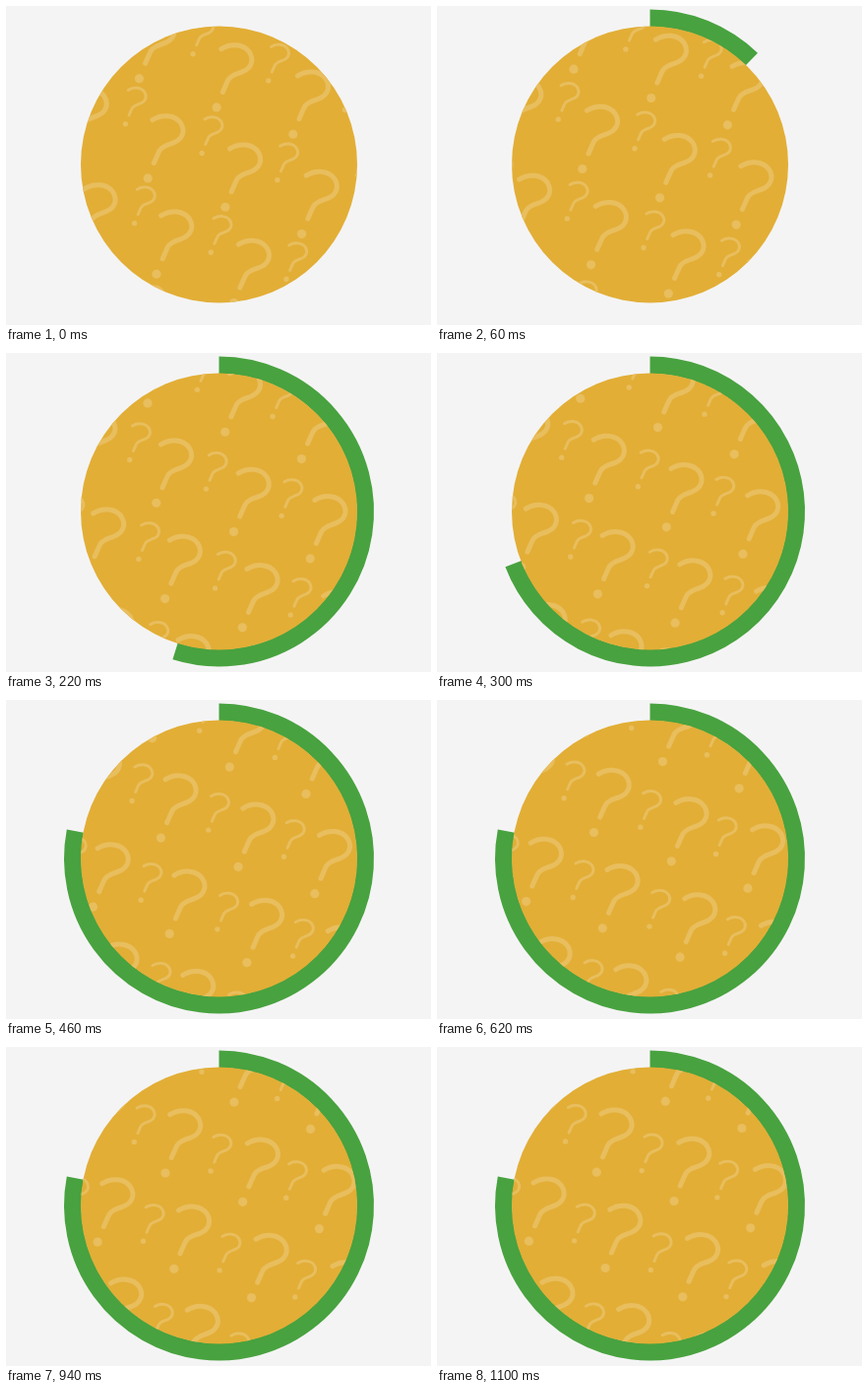
Recreate the animation shown at these times as an HTML page. Size 432 by 324 pixels, loop 1240 ms.

```html
<!DOCTYPE html>
<html lang="en">
<head>
<meta charset="utf-8">
<title>Question dial</title>
<style>
  html, body { margin: 0; width: 100%; height: 100%; overflow: hidden; background: #f4f4f4; }
  svg { display: block; width: 100vw; height: 100vh; }
</style>
</head>
<body>
<svg viewBox="0 0 432 324">
  <defs>
    <clipPath id="disc"><circle cx="216.5" cy="161" r="140.5"/></clipPath>
    <g id="mark">
      <path d="M4.7-59.4C14-65.3 27.5-64.7 33.4-56C38.4-47.8 35.3-39.6 26-36C20-33.6 15-33 11.8-28C9.8-24 8-19.5 6.2-15.5"
        fill="none" stroke="#e8be5e" stroke-width="5" stroke-linecap="round" stroke-linejoin="round"/>
      <circle r="4.6" fill="#e8be5e"/>
    </g>
  </defs>
  <path id="ring" fill="none" stroke="#48a23f" stroke-width="17.5"/>
  <circle cx="216.5" cy="161" r="140.5" fill="#e2ae36"/>
  <g clip-path="url(#disc)">
    <g id="big"></g>
    <g id="small"></g>
  </g>
</svg>
<script>
const LOOP = 1240;
const CX = 216.5, CY = 161, RING_R = 148.75;
const SWEEP = 0.78 * 2 * Math.PI;
const DRIFT = { x: 18.2, y: -48 };
const $ = id => document.getElementById(id);
const clamp = v => Math.min(1, Math.max(0, v));

// Slanted grid of marks; odd columns and rows sit slightly off the even ones.
function addMarks(layer, { x, y, scale, col, row, oddCol, oddRow }) {
  let marks = "";
  for (let r = 0; r < 4; r++) {
    for (let c = 0; c < 5; c++) {
      const px = x + c * col[0] + r * row[0] - (c % 2) * 0.5;
      const py = y + c * col[1] + r * row[1] + (c % 2) * oddCol + (r % 2) * oddRow;
      marks += `<use href="#mark" transform="translate(${px} ${py}) scale(${scale})"/>`;
    }
  }
  layer.innerHTML = marks;
}

function bezier(x1, y1, x2, y2) {
  const at = (s, a, b) => 3 * (1 - s) * (1 - s) * s * a + 3 * (1 - s) * s * s * b + s * s * s;
  return x => {
    if (x <= 0 || x >= 1) return clamp(x);
    let lo = 0, hi = 1;
    for (let i = 0; i < 30; i++) {
      const mid = (lo + hi) / 2;
      if (at(mid, x1, x2) < x) lo = mid; else hi = mid;
    }
    return at(lo, y1, y2);
  };
}

const driftEase = bezier(0.083, 0.5, 0.59, 1);
const sineOut = x => Math.sin(x * Math.PI / 2);

function arc(angle) {
  if (angle <= 0) return "";
  const x = CX + RING_R * Math.sin(angle), y = CY - RING_R * Math.cos(angle);
  return `M${CX} ${CY - RING_R}A${RING_R} ${RING_R} 0 ${angle > Math.PI ? 1 : 0} 1 ${x} ${y}`;
}

function shift(layer, amount) {
  layer.setAttribute("transform", `translate(${DRIFT.x * amount} ${DRIFT.y * amount})`);
}

function draw(t) {
  $("ring").setAttribute("d", arc(SWEEP * sineOut(clamp((t - 20.5) / 404))));
  const p = driftEase(clamp(t / 1090));
  shift($("big"), p);
  shift($("small"), p / 2);
}

addMarks($("big"), {
  x: 57.6, y: 46.6, scale: 1, col: [78.2, 28.3], row: [8.8, 99.3], oddCol: -1, oddRow: 2
});
addMarks($("small"), {
  x: 35.6, y: -8, scale: 0.58, col: [77.2, 28.4], row: [9.1, 100.8], oddCol: -1.2, oddRow: 0
});

const start = performance.now();
function tick() {
  draw((performance.now() - start) % LOOP);
  requestAnimationFrame(tick);
}
draw(0);
requestAnimationFrame(tick);
</script>
</body>
</html>
```
